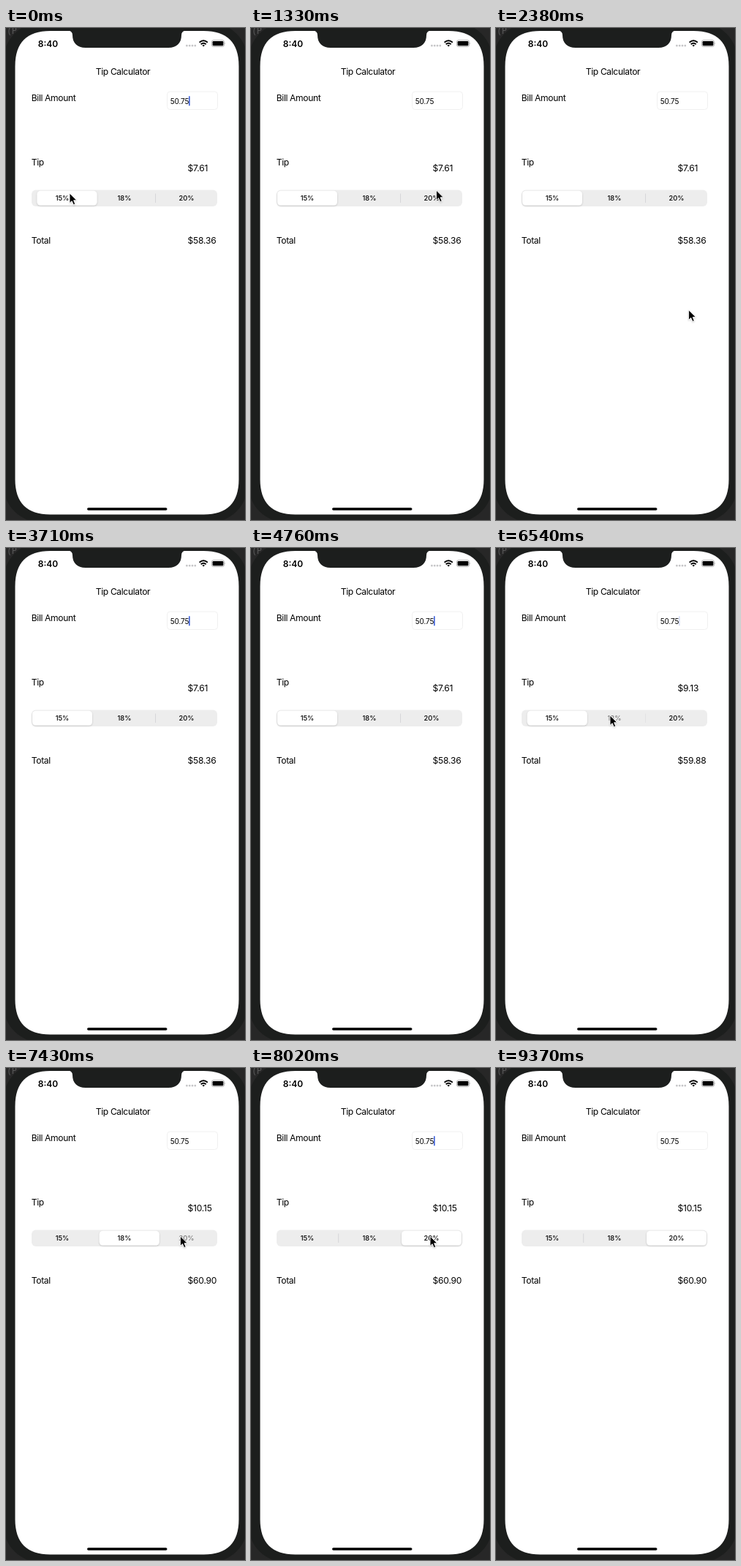
An HTML page that plays this animation: 327 by 673 pixels, repeating every 9.47 s.

```html
<!DOCTYPE html>
<html lang="en">
<head>
<meta charset="utf-8">
<title>Tip Calculator</title>
<style>
  html, body { margin: 0; width: 100%; height: 100%; overflow: hidden; background: #272727; }
  svg { display: block; width: 327px; height: 673px; }
  text { font: 12.1px Inter, Roboto, sans-serif; letter-spacing: -.03em; fill: #000; }
  .clock { font-size: 12px; font-weight: 600; letter-spacing: 0; }
  .field { font-size: 10px; letter-spacing: -.015em; }
  .money { letter-spacing: -.02em; }
  .seg { font-size: 9.3px; font-weight: 500; letter-spacing: 0; text-anchor: middle; }
  .behind { font: 12px "Noto Sans Mono", monospace; fill: #5a5a5a; }
</style>
</head>
<body>
<svg viewBox="0 0 327 673">
  <defs>
    <filter id="soft" x="-20%" y="-40%" width="140%" height="200%">
      <feDropShadow dx="0" dy="1" stdDeviation="1" flood-opacity=".2"/>
    </filter>
  </defs>

  <!-- Phone -->
  <text class="behind" x="1" y="8">(P</text>
  <rect x="-3" y="-7" width="333" height="683" rx="50" fill="#1c1e1d"/>
  <path fill="#fff" d="M12.5 52c0-32 16-48 48-48h210c32 0 48 16 48 48v565.5c0 32-16 48-48 48h-210c-32 0-48-16-48-48z"/>
  <path d="M85 3.5Q91 4 91 10C91 20 97 27 109 27H222C234 27 240 20 240 10Q240 4 246 3.5Z" fill="#1c1e1d"/>
  <rect x="111" y="656.2" width="109.5" height="3.5" rx="1.75"/>

  <!-- Status bar -->
  <text class="clock" x="43.8" y="25.8">8:40</text>
  <path d="M247.4 24.2H259" stroke="#c6c6c8" stroke-width="2.8" stroke-linecap="round" stroke-dasharray="0 3.8"/>
  <g fill="none" stroke="#000" stroke-width="1.9">
    <path d="M264.6 19.7Q270.2 14.9 275.8 19.7M266.7 22.2Q270.2 19.1 273.7 22.2"/>
    <path d="M268.4 23.7Q270.2 22.3 272 23.7L270.2 25.6Z" fill="#000" stroke="none"/>
  </g>
  <rect x="281.4" y="16.7" width="17.2" height="8.8" rx="2.5" fill="none" stroke="#a5a5a5" stroke-width=".8"/>
  <rect x="282.6" y="17.9" width="14.8" height="6.4" rx="1.4"/>
  <path d="M299.5 19.6Q301 21.1 299.5 22.6Z" fill="#a5a5a5"/>

  <!-- Form -->
  <text x="122.8" y="64">Tip Calculator</text>
  <text x="34.8" y="99.8">Bill Amount</text>
  <text x="34.8" y="188.3">Tip</text>
  <text x="34.8" y="294.7">Total</text>
  <rect x="220.5" y="87" width="69" height="24.5" rx="4" fill="#fff" stroke="#efefef" stroke-width=".9"/>
  <text class="field" x="224.8" y="103.7">50.75</text>
  <rect id="caret" x="250" y="93" width="1.7" height="13.5" rx=".8" fill="#4668dc"/>
  <text class="money" id="tip" x="248.6" y="196"></text>
  <text class="money" id="total" x="248.6" y="294.7"></text>

  <!-- Tip rate control -->
  <rect x="35" y="221.5" width="254" height="22.5" rx="5.8" fill="#ededed"/>
  <path id="sepA" d="M119.7 226.5V239" stroke="#d4d4d6" stroke-width=".9"/>
  <path id="sepB" d="M204.5 226.5V239" stroke="#d4d4d6" stroke-width=".9"/>
  <rect id="pill" y="222.8" width="82" height="19.8" rx="4.8" fill="#fff" filter="url(#soft)"/>
  <text class="seg" x="77" y="236">15%</text>
  <text class="seg" id="mid" x="162" y="236">18%</text>
  <text class="seg" id="high" x="247" y="236">20%</text>

  <path id="cursor" d="M0 0V13.6L3.1 10.7L5.3 15.7L7.7 14.7L5.6 9.8H9.8Z" stroke="#fff" stroke-width=".9" filter="url(#soft)"/>
</svg>

<script>
// The picture advances in even steps; k counts them
const LOOP = 9470, STEP = 148.6, BILL = 50.75;
const TAP_18 = 44, TAP_20 = 50;
const $ = id => document.getElementById(id);
const set = (id, name, value) => $(id).setAttribute(name, value);
const clamp = v => Math.min(1, Math.max(0, v));
const ease = v => (v = clamp(v), v * v * (3 - 2 * v));

// First visit: glide right, rest, then curve off the bottom
function firstVisit(k) {
  const glide = ease((k - .5) / 8.5), exit = clamp((k - 13) / 5);
  return [
    87 + 166.5 * glide - 18 * exit + 22 * Math.sin(Math.PI * exit),
    226 - 4 * glide + 455 * exit ** 2
  ];
}

// Second visit: slow down onto 18%, cross to 20%, speed away to the lower left
function secondVisit(k) {
  const left = clamp((42 - k) / 6.5), cross = ease((k - 47) / 3.6), exit = clamp((k - 55) / 4);
  return [
    156 + 84 * left ** 1.25 + 89 * cross - 156 * exit ** 2,
    229 + 190 * left ** 2 + cross + 214 * exit ** 2
  ];
}

const pointer = k => k < 18 ? firstVisit(k) : k >= 36 && k < 60 ? secondVisit(k) : null;

function caretOpacity(k) {
  const phase = k * STEP % 1000;
  return phase < 400 ? clamp((300 - phase) / 90) : clamp((phase - 500) / 170);
}

// A tapped label dims, then recovers
const press = (k, tap) => .5 + .5 * clamp(Math.abs(k - tap) / 2);

function draw(t) {
  const k = Math.floor((t + 9) / STEP);
  const rate = k < TAP_18 ? .15 : k < TAP_20 ? .18 : .2;
  const tip = BILL * rate;
  $("tip").textContent = "$" + tip.toFixed(2);
  $("total").textContent = "$" + (BILL + tip).toFixed(2);

  const settle = 6.5 * clamp(1 - k);
  const slide = tap => ease((k - tap + .45) / 2.6);
  set("pill", "x", 36 + settle + 85 * (slide(TAP_18) + slide(TAP_20)));
  set("sepA", "opacity", clamp((k - TAP_20) / 2));
  set("sepB", "opacity", clamp((TAP_18 + 1 - k) / 2));
  set("mid", "opacity", press(k, TAP_18));
  set("high", "opacity", press(k, TAP_20));
  set("caret", "opacity", caretOpacity(k));

  const at = pointer(k);
  set("cursor", "visibility", at ? "visible" : "hidden");
  if (at) set("cursor", "transform", `translate(${at})`);
}

const start = performance.now();
function tick() {
  draw((performance.now() - start) % LOOP);
  requestAnimationFrame(tick);
}
tick();
</script>
</body>
</html>
```
